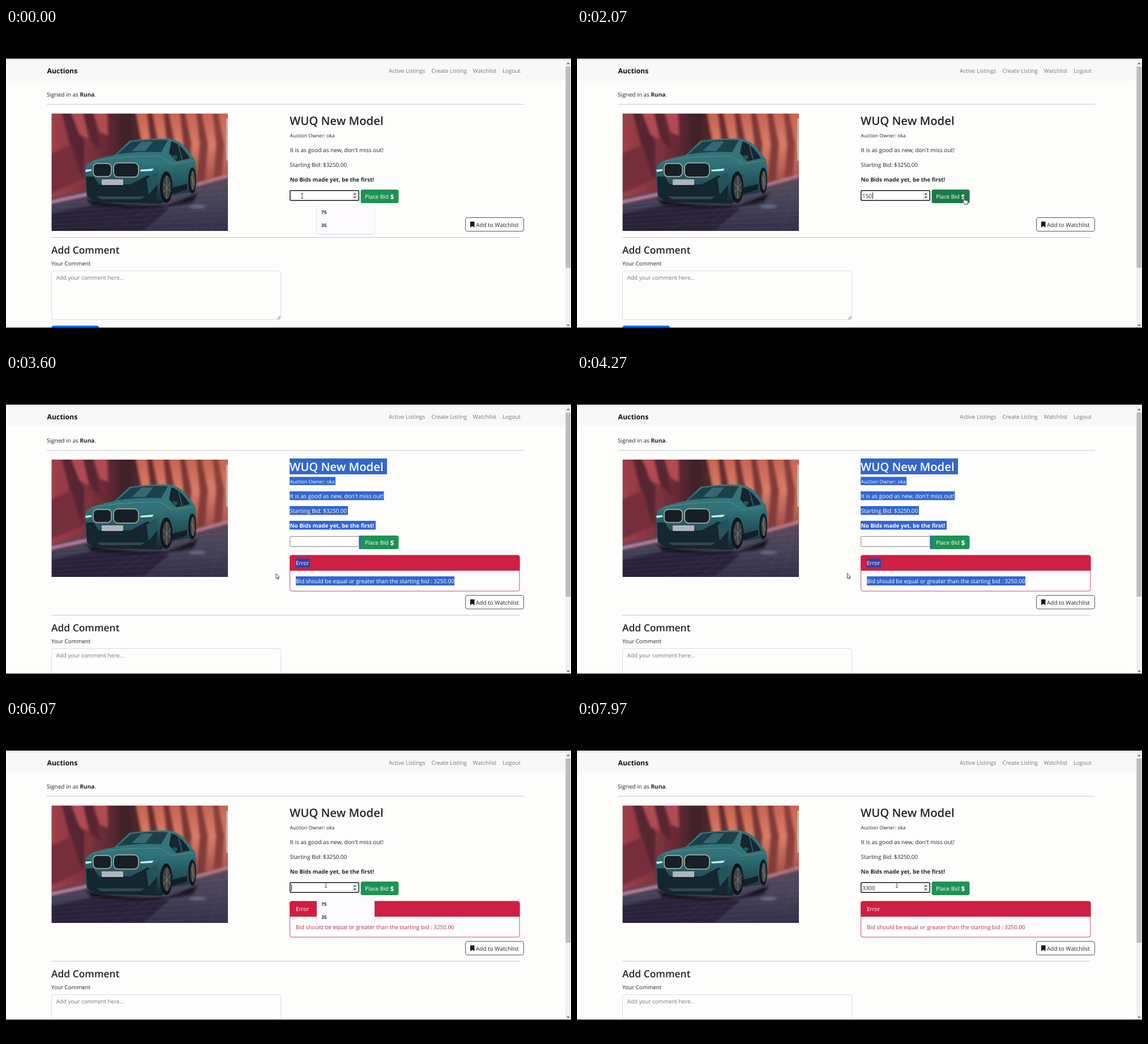
An HTML page for the animation above (8000 ms loop, 998 px wide and 561 px high).

```html
<!DOCTYPE html>
<html lang="en">
<head>
<meta charset="utf-8">
<title>Auctions</title>
<style>
  html, body { margin: 0; height: 100%; overflow: hidden; background: #000; }
  svg { display: block; width: 998px; height: 561px; }
  text { font: 9.87px "Open Sans", "Noto Sans", sans-serif; fill: #212529; text-rendering: geometricPrecision; white-space: pre; }
  .bold { font-weight: 700; }
  .nav text { fill: #777; }
  .white text, text.white { fill: #fff; }
  .picked .pickable { fill: #fff; }
  .rule { stroke: #c6c6ca; }
  .hint { fill: #71767c; }
  .menu text { font-size: 8.2px; font-weight: 700; }
</style>
</head>
<body>
<svg id="stage" viewBox="0 0 998 561">
  <defs>
    <linearGradient id="wall">
      <stop stop-color="#a8424c"/><stop offset=".3" stop-color="#6d2c36"/><stop offset=".42" stop-color="#3d2229"/>
      <stop offset=".6" stop-color="#6f3031"/><stop offset="1" stop-color="#8f4440"/>
    </linearGradient>
    <linearGradient id="road" x2="0" y2="1">
      <stop stop-color="#5d4a5c"/><stop offset=".45" stop-color="#454259"/><stop offset="1" stop-color="#2f2c45"/>
    </linearGradient>
    <linearGradient id="fold" x2="0" y2="1">
      <stop stop-color="#c4604f"/><stop offset=".5" stop-color="#d97c65"/><stop offset="1" stop-color="#a4514c"/>
    </linearGradient>
    <linearGradient id="paint" x2="0" y2="1">
      <stop stop-color="#3a747a"/><stop offset=".38" stop-color="#2f7379"/><stop offset=".7" stop-color="#234f59"/><stop offset="1" stop-color="#14242f"/>
    </linearGradient>
    <clipPath id="photoArea"><rect x="80.5" y="151" width="311.5" height="207"/></clipPath>
    <clipPath id="dragArea"><rect id="dragClip" y="357" height="17"/></clipPath>
    <filter id="soft"><feGaussianBlur stdDeviation=".6"/></filter>
    <filter id="haze"><feGaussianBlur stdDeviation="2"/></filter>
    <filter id="shade" x="-10%" y="-20%" width="120%" height="150%">
      <feDropShadow dx="0" dy=".7" stdDeviation="1" flood-color="#7d7a99" flood-opacity=".45"/>
    </filter>
  </defs>

  <rect y="54" width="998" height="475" fill="#fdfefc"/>
  <rect y="54" width="998" height="3" fill="#e6e7ec"/>
  <rect y="57" width="988" height="36" fill="#f7f8f7"/>
  <text class="bold" x="72.5" y="79.7" style="font-size:12.3px;fill:#111">Auctions</text>
  <g class="nav">
    <text x="676" y="79">Active Listings</text>
    <text x="751.5" y="79">Create Listing</text>
    <text x="824.5" y="79">Watchlist</text>
    <text x="877" y="79">Logout</text>
  </g>
  <text x="72" y="120.6" style="font-size:10.05px">Signed in as <tspan class="bold">Runa</tspan>.</text>
  <path class="rule" d="M72 134.5H915"/>

  <!-- Car photo -->
  <g clip-path="url(#photoArea)">
    <g filter="url(#haze)">
      <rect x="70" y="141" width="332" height="227" fill="url(#wall)"/>
      <path d="M96 141L122 240L138 270V200L112 141ZM132 141L150 200L168 215L152 141Z" fill="#572531"/>
      <path d="M112 141H134L146 196L130 188ZM152 141H178L180 190L166 184Z" fill="#b14c53"/>
      <path d="M70 225L116 206L134 268L70 296Z" fill="#762f3b"/>
      <g id="folds" fill="url(#fold)"></g>
      <path d="M70 302L140 287L336 272L402 258V368H70Z" fill="url(#road)"/>
      <path d="M70 330L170 308L290 318L230 368H70Z" fill="#261d35" opacity=".75"/>
      <path d="M70 309L145 293" stroke="#e79abb" stroke-width="3"/>
      <path d="M334 277L402 258" stroke="#c98390" stroke-width="4"/>
      <path d="M140 300Q200 314 286 312L340 290L330 308Q240 326 150 312Z" fill="#14121d"/>
      <ellipse cx="338" cy="315" rx="15" ry="3" fill="#8389a8" opacity=".6"/>
    </g>
    <g id="paving" stroke="#8a819c" stroke-opacity=".14"></g>
    <g filter="url(#soft)">
      <path d="M141 243Q148 232 192 224L218 199Q250 194 290 195Q311 200 322 217L334 233Q338 252 335 272L325 290L292 295L274 310L158 307L143 297Q138 270 141 243Z" fill="url(#paint)"/>
      <path d="M196 223L221 201Q252 196 286 198L274 219Q232 217 196 223Z" fill="#1a404c"/>
      <path d="M222 217L240 200H260L246 217Z" fill="#376772"/>
      <path d="M292 200Q310 205 325 230L301 235L288 221Z" fill="#18242e"/>
      <path d="M304 204L311 232" stroke="#2d6870" stroke-width="1.5"/>
      <path d="M152 236Q192 226 272 226L290 237" fill="none" stroke="#529295" stroke-width="1"/>
      <path d="M141 262L155 262L164 276H220L250 260L268 268L265 309L158 306L144 297Z" fill="#142630"/>
      <path d="M248 266L266 254L269 274L252 294Z" fill="#24525d"/>
      <path d="M160 297H245L238 302H168Z" fill="#31464f"/>
      <path d="M293 282L320 275V285L294 293Z" fill="#141e28"/>
      <path d="M288 240L332 234" stroke="#8d7a62" stroke-width=".8"/>
      <g fill="#171f26" stroke="#b9b7a5" stroke-width="1.5">
        <rect x="154" y="239" width="32" height="23" rx="7"/>
        <rect x="190" y="238" width="44" height="25" rx="8"/>
      </g>
      <path d="M140 250L151 249V252L141 254ZM237 250L261 248L258 252L238 253Z" fill="#c4f2ea"/>
      <rect x="169" y="267" width="38" height="10" rx="1" fill="#b0b4bd"/>
      <ellipse cx="283" cy="281" rx="11" ry="28" fill="#11151b"/>
      <ellipse cx="284" cy="281" rx="7.5" ry="21" fill="#3c4142"/>
      <path d="M284 261V301M277 274L291 289M291 273L278 290" stroke="#85806d"/>
      <ellipse cx="329" cy="269" rx="7" ry="23" fill="#11161c"/>
      <ellipse cx="330" cy="269" rx="4.5" ry="17" fill="#444745"/>
      <path d="M330 253V285M327 262L333 277" stroke="#85806d"/>
      <ellipse cx="298" cy="228" rx="5" ry="3.5" fill="#24535d"/>
      <path d="M390.5 160V234" stroke="#c9b5b0" stroke-width="3"/>
    </g>
  </g>

  <!-- Listing -->
  <g id="listing">
    <g id="picks" fill="#3366cf">
      <rect x="501" y="149" width="172" height="28"/>
      <rect x="501" y="181.5" width="81" height="14.5"/>
      <rect x="501" y="207" width="166.5" height="15.5"/>
      <rect x="501" y="233" width="103" height="15.5"/>
      <rect x="501" y="259" width="152" height="15.5"/>
      <rect x="623.5" y="285" width="5" height="24"/>
    </g>
    <text class="pickable" x="501" y="171" style="font-size:20.3px;font-weight:600">WUQ New Model</text>
    <text class="pickable" x="501.5" y="192.6" style="font-size:8.65px">Auction Owner: oka</text>
    <text class="pickable" x="501.5" y="218.6" style="font-size:10.1px">It is as good as new, don't miss out!</text>
    <text class="pickable" x="501.5" y="244.6">Starting Bid: $3250.00</text>
    <text class="pickable bold" x="501.5" y="270.6">No Bids made yet, be the first!</text>
  </g>

  <rect id="field" fill="#fff"/>
  <g id="spinner">
    <rect x="611" y="289" width="10" height="13.5" fill="#ececec"/>
    <path d="M613.5 294L616 291L618.5 294ZM613.5 297.5L616 300.5L618.5 297.5Z" fill="#444"/>
  </g>
  <text id="typed" x="504" y="299.6"></text>
  <path id="caret" stroke="#111" d="M0 290V301.5"/>
  <g class="white">
    <rect id="bidButton" x="626.5" y="285" width="67" height="24" rx="3.5"/>
    <text x="634" y="301.2">Place Bid</text>
    <text class="bold" x="678.5" y="301.7" style="font-size:12px">$</text>
  </g>

  <g id="error">
    <rect x="501.5" y="320" width="405.5" height="63" rx="3.5" fill="#fdfefc" stroke="#b94a85"/>
    <path d="M501 347V323.5Q501 319.5 505 319.5H903.5Q907.5 319.5 907.5 323.5V347Z" fill="#cf1f42"/>
    <rect id="pickHead" x="512" y="325.5" width="25" height="15.5" fill="#3240a8"/>
    <text class="white" x="512" y="337.2">Error</text>
    <text x="512" y="368.8" style="fill:#b82c50">Bid should be equal or greater than the starting bid : 3250.00</text>
    <g clip-path="url(#dragArea)">
      <rect x="512" y="357" width="280" height="16" fill="#3366cf"/>
      <text class="white" x="512" y="368.8">Bid should be equal or greater than the starting bid : 3250.00</text>
    </g>
  </g>

  <g id="lower">
    <rect x="811.5" y="334.5" width="103" height="24" rx="3.5" fill="none" stroke="#55585b"/>
    <path d="M820 342.5Q820 341.5 821 341.5H826.5Q827.5 341.5 827.5 342.5V352L823.75 349.3L820 352Z" fill="#16191c"/>
    <text x="830" y="350.7" style="font-size:10px">Add to Watchlist</text>
    <path class="rule" d="M80 369.5H907"/>
    <text x="80" y="398" style="font-size:17.4px;font-weight:600">Add Comment</text>
    <text x="80" y="419.2">Your Comment</text>
    <rect x="80.5" y="428.5" width="405" height="86" rx="3.5" fill="#fdfefc" stroke="#dadae6"/>
    <text class="hint" x="88.5" y="444">Add your comment here...</text>
    <path d="M479 513.5L484.5 508M482 513.5L484.5 511" stroke="#555"/>
    <rect x="80.5" y="525" width="83.5" height="24" rx="3.5" fill="#0d6efd"/>
  </g>

  <g id="menu" class="menu">
    <rect id="menuBox" x="549" y="313" width="102" rx="4.5" fill="#fdfaff" filter="url(#shade)"/>
    <text id="option1" x="557" y="327.8"></text>
    <text id="option2" x="557" y="351"></text>
  </g>

  <!-- Scrollbar -->
  <rect x="988" y="57" width="10" height="472" fill="#f1f1f1"/>
  <path d="M990 64L993 60.5L996 64ZM990 523L993 526.5L996 523Z" fill="#70757a"/>
  <rect id="thumb" x="988.5" y="68" width="8.5" fill="#bdbdc0"/>

  <g id="cursor" stroke-linejoin="round">
    <path id="beam" d="M-2 -4.5H-.5L0 -4L.5 -4.5H2M0 -4V4M-2 4.5H-.5L0 4L.5 4.5H2" fill="none" stroke="#333" stroke-width=".9"/>
    <path id="arrow" d="M0 -5V4L2 2.2L3.4 5.3L4.9 4.6L3.5 1.7H6Z" fill="#fff" stroke="#333" stroke-width=".9"/>
    <path id="hand" d="M-1 0Q0 -1.3 1 0V4.5L5.5 5.5Q6.8 6 6.6 7.8L5.7 12H.3L-2.8 7.6Q-3.2 6 -1.7 6.4L-1 7.2Z" fill="#fff" stroke="#222" stroke-width=".9"/>
  </g>

  <path d="M0 0H998V54H0ZM0 528.5H998V561H0Z"/>
</svg>

<script>
const LOOP = 8000, FIRST_FOCUS = -600, BLUR = 2150, RELOAD = 2400, REFOCUS = 4800;
const typing = [[FIRST_FOCUS, ''], [450, '1'], [700, '15'], [900, '150'], [RELOAD, ''],
  [REFOCUS, ''], [6500, '3'], [7180, '33'], [7330, '330'], [7450, '3300']];
const menus = [[0, ['75', '35']], [450, []], [REFOCUS, ['75', '35']], [6500, ['35']], [7180, []]];
const route = [[0, 523, 296], [1400, 523, 296], [2000, 684, 299], [2750, 684, 299], [3120, 793, 366],
  [3200, 793, 366], [3550, 477, 357], [4250, 477, 357], [4700, 565, 291], [LOOP, 565, 291]];

const $ = id => document.getElementById(id);
const set = (id, attrs) => Object.entries(attrs).forEach(([name, value]) => $(id).setAttribute(name, value));
const show = (id, on) => { $(id).style.display = on ? '' : 'none'; };
const latest = (list, t) => list.findLast(entry => entry[0] <= t);

function cursorAt(t) {
  const i = route.findIndex(point => point[0] > t);
  const [t0, x0, y0] = route[i - 1], [t1, x1, y1] = route[i];
  const u = (t - t0) / (t1 - t0), ease = u * u * (3 - 2 * u);
  return [x0 + (x1 - x0) * ease, y0 + (y1 - y0) * ease];
}

function buildPhoto() {
  let folds = '', paving = '';
  for (let i = 0; i < 6; i++) {
    const x = 228 + i * 29;
    folds += `<path d="M${x} 141H${x + 20}L${x + 27} 205L${x + 22} 270L${x + 8} 266L${x + 13} 205Z"/>`;
  }
  for (let i = 0; i < 9; i++) {
    paving += `<path d="M${150 + i * 30} 363L${300 + i * 12} 280M80 ${312 + i * 7}L392 ${280 + i * 10}"/>`;
  }
  $('folds').innerHTML = folds;
  $('paving').innerHTML = paving;
}

function draw(t) {
  const [x, y] = cursorAt(t);
  const failed = t >= RELOAD;
  const focused = t < BLUR || t >= REFOCUS;

  show('error', failed);
  set('lower', { transform: `translate(0 ${failed ? 56 : 0})` });
  set('thumb', { height: failed ? 325 : 355 });

  // Bid field
  const line = focused ? 1.5 : 1;
  set('field', { x: 501 + line / 2, y: 286 + line / 2, width: 123 - line, height: 19 - line, rx: 2,
    stroke: focused ? '#16161c' : '#858585', 'stroke-width': line });
  show('spinner', focused);
  const [keyTime, value] = latest(typing, t);
  $('typed').textContent = value;
  show('caret', focused && (t - keyTime) % 1000 < 500);
  const textWidth = value ? $('typed').getComputedTextLength() : 0;
  set('caret', { transform: `translate(${504.5 + textWidth + (value ? 1 : 0)} 0)` });

  const options = latest(menus, t)[1];
  show('menu', options.length);
  set('menuBox', { height: options.length > 1 ? 50 : 26 });
  $('option1').textContent = options[0] || '';
  $('option2').textContent = options[1] || '';

  // Text selection, dragged leftwards from the end of the error message
  const selecting = t >= 3200 && t < REFOCUS;
  const all = selecting && (x < 501 || t > 3550);
  const left = all ? 512 : Math.min(792, Math.max(512, x));
  set('dragClip', { x: left, width: selecting ? 792 - left : 0 });
  show('picks', all);
  show('pickHead', all);
  $('listing').classList.toggle('picked', all);

  // Pointer
  const onButton = x > 626 && x < 694 && y > 285 && y < 309;
  const onField = x > 501 && x < 624 && y > 286 && y < 305;
  const onMessage = x > 511 && x < 796 && y > 356 && y < 374;
  set('cursor', { transform: `translate(${x} ${y})` });
  show('hand', onButton);
  show('beam', onField || onMessage);
  show('arrow', !onButton && !onField && !onMessage);
  set('bidButton', { fill: onButton ? '#197d46' : '#1d9353' });
}

function tick(now) {
  draw(now % LOOP);
  requestAnimationFrame(tick);
}

buildPhoto();
draw(0);
requestAnimationFrame(tick);
</script>
</body>
</html>
```
